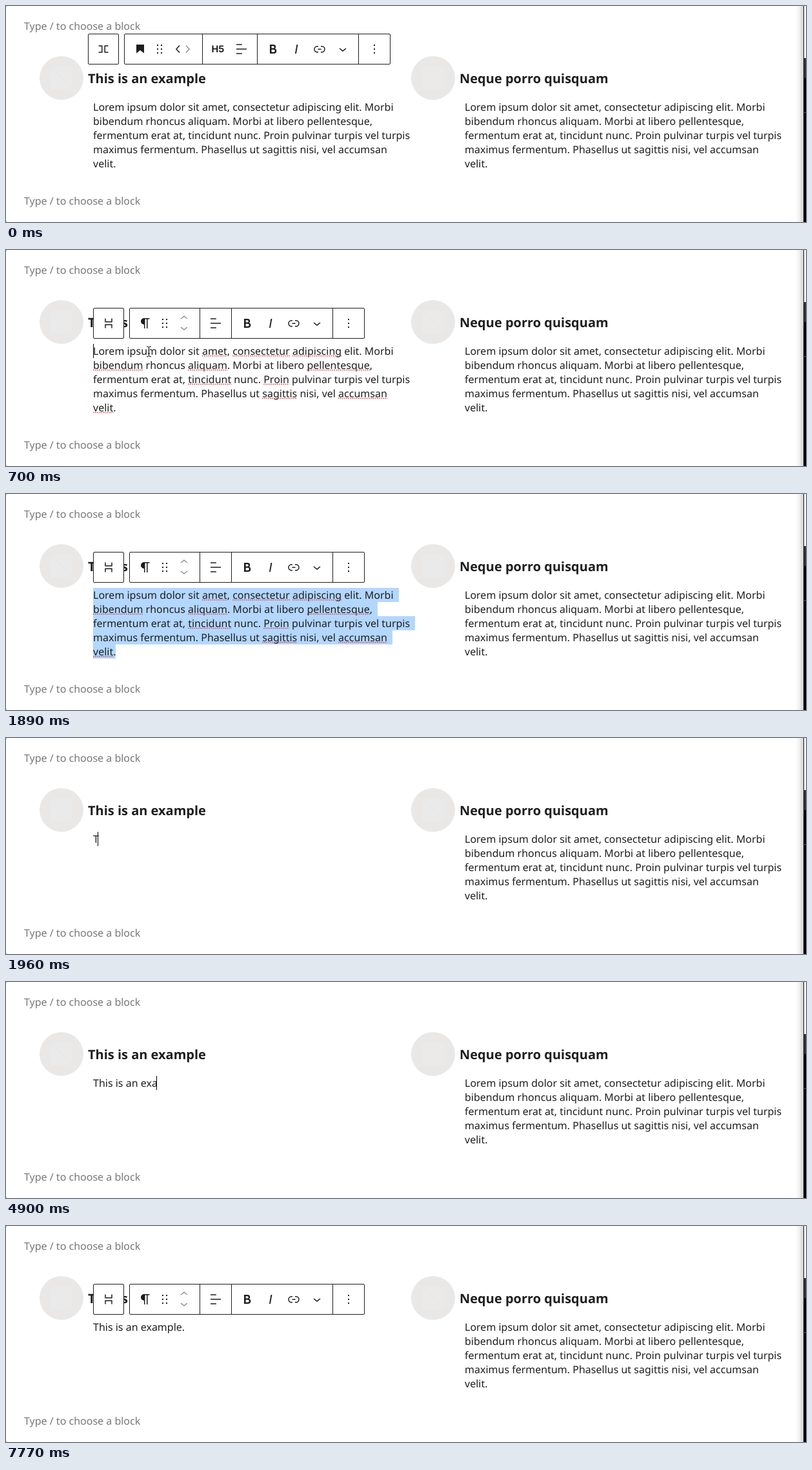
Recreate the animation shown at these times as an HTML page with a canvas. Size 1240 by 336 pixels, loop 8190 ms.

```html
<!DOCTYPE html>
<html lang="en">
<head>
<meta charset="utf-8">
<title>Block editor</title>
<style>
  html, body { margin: 0; width: 100%; height: 100%; overflow: hidden; background: #fff; }
  canvas { display: block; width: 1240px; height: 336px; }
</style>
</head>
<body>
<canvas id="stage" width="1240" height="336"></canvas>
<script>
const ctx = document.getElementById('stage').getContext('2d');
const LOOP = 8190, STEP = 70;
const INK = '#1e1e1e', MUTED = '#949494';
const BODY = '16px "Noto Sans", sans-serif';
const HEADING = 'bold 20px "Noto Sans", sans-serif';
const LEFT = 135, RIGHT = 711, TOP = 146, LINE = 22;

const LOREM = [
  'Lorem ipsum dolor sit amet, consectetur adipiscing elit. Morbi',
  'bibendum rhoncus aliquam. Morbi at libero pellentesque,',
  'fermentum erat at, tincidunt nunc. Proin pulvinar turpis vel turpis',
  'maximus fermentum. Phasellus ut sagittis nisi, vel accumsan',
  'velit.'
];
const MISSPELLED = [
  ['amet', 'consectetur', 'adipiscing'],
  ['bibendum', 'aliquam', 'pellentesque'],
  ['tincidunt', 'Proin'],
  ['sagittis', 'accumsan'],
  ['velit']
];

// Moment each character of the new sentence is typed
const TYPED = 'This is an example.';
const KEYS = [1960, 2170, 2310, 2520, 2800, 2870, 3080, 3150, 3500, 3780,
  4060, 4270, 4480, 4900, 5670, 5880, 6020, 6160, 7210];
const CARET_ON = 560;

const CLICK = 630, SELECT = 1890, WAKE = 7280, LEAVE = 7630;

const ICONS = {
  bookmark: 'M6 5V18.6L12 13.85L18 18.6V5Z',
  pilcrow: 'M10 14v6h1.5V5.5H14V20h1.5V5.5h3V4H10a5 5 0 0 0 0 10z',
  grip: 'M8 7h2V5H8zM8 13h2v-2H8zM8 19h2v-2H8zM14 5v2h2V5zM14 13h2v-2h-2zM14 19h2v-2h-2z',
  left: 'M14.6 7l-1.2-1L8 12l5.4 6 1.2-1-4.6-5z',
  right: 'M10.6 6L9.4 7l4.6 5-4.6 5 1.2 1 5.4-6z',
  up: 'M6.5 12.4L12 8l5.5 4.4-.9 1.2L12 10l-4.5 3.6z',
  down: 'M17.5 11.6L12 16l-5.5-4.4.9-1.2L12 14l4.5-3.6z',
  align: 'M4 19.8h8.9v-1.5H4zM4 5.7h8.9V4.2H4zM4 12.7h16v-1.5H4z',
  bold: 'M14.7 11.3c1-.6 1.5-1.6 1.5-3 0-2.3-1.3-3.4-4-3.4H7v14h5.8c1.4 0 2.5-.3 3.3-1 .8-.7 1.2-1.7 1.2-2.9.1-1.9-.8-3.1-2.6-3.7z' +
    'M9.6 7.3h2.3c1.2 0 1.9.6 1.9 1.6s-.7 1.6-1.9 1.6H9.6zM14.2 16.3c-.4.3-1 .4-1.7.4H9.6v-3.9h2.9c1.5 0 2.3.7 2.3 2 0 .7-.2 1.2-.6 1.5z',
  italic: 'M12.5 5L10 19h1.9l2.5-14z',
  link: 'M10 17.4H8.44a5.2 5.2 0 1 1 0-10.4H10v1.5H8.44a3.7 3.7 0 0 0 0 7.4H10z' +
    'M14 7h1.56a5.2 5.2 0 0 1 0 10.4H14v-1.5h1.56a3.7 3.7 0 0 0 0-7.4H14zM9.5 13h5v-1.5h-5z',
  more: 'M13 19h-2v-2h2zM13 13h-2v-2h2zM13 7h-2V5h2z',
  arrow: 'M0 0V16L3.7 12.5L6.1 18.1L8.7 17L6.3 11.5H11.4Z',
  beam: 'M-3.5-8Q0-8 0-6Q0-8 3.5-8M0-6V6M-3.5 8Q0 8 0 6Q0 8 3.5 8M-1.5 3H1.5'
};
for (const name in ICONS) ICONS[name] = new Path2D(ICONS[name]);

function text(str, x, y, font, color) {
  ctx.font = font;
  ctx.fillStyle = color;
  ctx.fillText(str, x, y);
}

function rect(x, y, w, h, color) {
  ctx.fillStyle = color;
  ctx.fillRect(x, y, w, h);
}

function measure(str) {
  ctx.font = BODY;
  return ctx.measureText(str).width;
}

// Runs a drawing routine with the origin moved to x, y
function at(x, y, draw) {
  ctx.save();
  ctx.translate(x, y);
  draw();
  ctx.restore();
}

function icon(name, x, y, color = INK) {
  at(x, y, () => {
    ctx.fillStyle = color;
    ctx.fill(ICONS[name], 'evenodd');
  });
}

function box(x, y, w) {
  ctx.beginPath();
  ctx.roundRect(x + .5, y + .5, w - 1, 47, 1.5);
  ctx.fillStyle = '#fff';
  ctx.fill();
  ctx.strokeStyle = INK;
  ctx.lineWidth = 1;
  ctx.stroke();
}

// Two brackets back to back; turned for the stacked variant
function brackets(x, y, turned) {
  at(x, y, () => {
    if (turned) ctx.rotate(Math.PI / 2);
    ctx.strokeStyle = INK;
    ctx.lineWidth = 1.5;
    ctx.beginPath();
    for (const side of [-1, 1]) {
      ctx.moveTo(side * 7.5, -5);
      ctx.lineTo(side * 2.2, -5);
      ctx.lineTo(side * 2.2, 5);
      ctx.lineTo(side * 7.5, 5);
    }
    ctx.stroke();
  });
}

function toolbar(x, y, width, dividers) {
  box(x, y, 48);
  box(x + 56, y, width);
  for (const d of dividers) rect(d, y, 1, 48, INK);
}

// Bold, italic, link, chevron and options, starting at x
function formatting(x, y, moreX) {
  ['bold', 'italic', 'link', 'down'].forEach((name, i) => icon(name, x + i * 36, y));
  icon('more', moreX, y);
}

function headingToolbar() {
  const y = 55;
  toolbar(127, 43, 413, [304, 389, 546]);
  brackets(151, 67, false);
  icon('bookmark', 196, y);
  icon('grip', 226, y);
  icon('left', 255, y);
  icon('right', 269, y, MUTED);
  text('H5', 318.5, 72.3, 'bold 14.5px Inter, sans-serif', INK);
  icon('align', 353, y);
  formatting(402, y, 559);
}

function paragraphToolbar() {
  const y = 102;
  toolbar(135, 90, 365, [300, 349, 506]);
  brackets(159, 114, true);
  icon('pilcrow', 204, y);
  icon('grip', 234, y);
  icon('up', 264, 94, MUTED);
  icon('down', 264, 109, MUTED);
  icon('align', 313, y);
  formatting(362, y, 519);
}

function avatar(x) {
  ctx.beginPath();
  ctx.arc(x, 112, 34, 0, Math.PI * 2);
  ctx.fillStyle = '#e9e8e7';
  ctx.fill();
  rect(x - 17, 95, 34, 34, '#eaeaea');
  ctx.beginPath();
  ctx.moveTo(x - 17, 95);
  ctx.lineTo(x + 17, 129);
  ctx.strokeStyle = '#e4e5e4';
  ctx.lineWidth = 1;
  ctx.stroke();
}

function windowEdge() {
  const shade = ctx.createLinearGradient(1224, 0, 1236, 0);
  shade.addColorStop(0, '#fff');
  shade.addColorStop(.5, '#f0f0f0');
  shade.addColorStop(1, '#cfcfcf');
  rect(1224, 0, 12, 336, shade);
  rect(1237, 0, 3, 81, '#f6f6f6');
  rect(1236, 0, 1, 336, '#161616');
  rect(1237, 81, 3, 31, '#333');
  rect(1237, 112, 3, 224, '#000');
  rect(1237, 165, 3, 1, '#555');
  rect(0, 0, 1, 1, '#777');
  rect(0, 335, 1, 1, '#777');
}

function paragraph(x) {
  LOREM.forEach((line, i) => text(line, x, TOP + 17 + i * LINE, BODY, INK));
}

function selection() {
  LOREM.forEach((line, i) => {
    const w = measure(line) + (i < LOREM.length - 1 ? 8 : 0);
    rect(LEFT, TOP + i * LINE, Math.round(w), LINE, '#b3d7ff');
  });
}

function underlines() {
  ctx.save();
  ctx.setLineDash([1.6, 1.4]);
  ctx.lineWidth = 1.6;
  ctx.strokeStyle = '#e0484c';
  MISSPELLED.forEach((words, i) => words.forEach(word => {
    const x = LEFT + measure(LOREM[i].slice(0, LOREM[i].indexOf(word)));
    const y = TOP + 18.8 + i * LINE;
    ctx.beginPath();
    ctx.moveTo(x, y);
    ctx.lineTo(x + measure(word), y);
    ctx.stroke();
  }));
  ctx.restore();
}

function typing(t) {
  const count = KEYS.filter(k => k <= t).length;
  const str = TYPED.slice(0, count);
  text(str, LEFT, TOP + 17, BODY, INK);
  if (t - KEYS[count - 1] < CARET_ON) {
    rect(Math.floor(LEFT + measure(str)) - 1, TOP, 1, LINE, '#000');
  }
}

function pointer(x, y, overText) {
  at(x, y, () => {
    const shape = overText ? ICONS.beam : ICONS.arrow;
    ctx.lineJoin = 'round';
    ctx.strokeStyle = '#fff';
    ctx.lineWidth = overText ? 2.6 : 2;
    ctx.stroke(shape);
    if (overText) {
      ctx.strokeStyle = '#000';
      ctx.lineWidth = 1;
      ctx.stroke(shape);
    } else {
      ctx.fillStyle = '#000';
      ctx.fill(shape);
    }
  });
}

function mouse(t) {
  const mix = (a, b, p) => a + (b - a) * p;
  if (t >= STEP && t < SELECT) {
    const u = Math.min(t / 560, 1);
    const p = u * u * (3 - 2 * u);
    const nudge = t >= 1260 ? 1 : 0;
    const x = mix(592, 221.5, p) + nudge * 4;
    const y = mix(336, 158, p) + nudge;
    pointer(x, y, y < 256);
  } else if (t >= WAKE && t < LEAVE) {
    const p = .78 * ((t - WAKE) / 280) ** 1.5;
    const y = mix(159, 336, p);
    pointer(mix(225.5, 592, p), y, y < 168);
  }
}

function draw(t) {
  rect(0, 0, 1240, 336, '#fff');
  windowEdge();
  for (const y of [37, 309]) text('Type / to choose a block', 28, y, BODY, '#787878');
  avatar(86);
  avatar(662);
  text('This is an example', 127, 120, HEADING, INK);
  text('Neque porro quisquam', 703, 120, HEADING, INK);
  paragraph(RIGHT);

  if (t < KEYS[0]) {
    if (t >= SELECT) selection();
    paragraph(LEFT);
    if (t >= CLICK) underlines();
    if (t >= CLICK && t < 840) rect(LEFT, TOP, 1, LINE, '#000');
  } else {
    typing(t);
  }

  if (t < CLICK) headingToolbar();
  else if (t < KEYS[0] || t >= WAKE) paragraphToolbar();
  mouse(t);
}

function frame() {
  const t = performance.now() % LOOP;
  draw(Math.floor(t / STEP) * STEP);
  requestAnimationFrame(frame);
}

ctx.textRendering = 'geometricPrecision';
frame();
</script>
</body>
</html>
```
